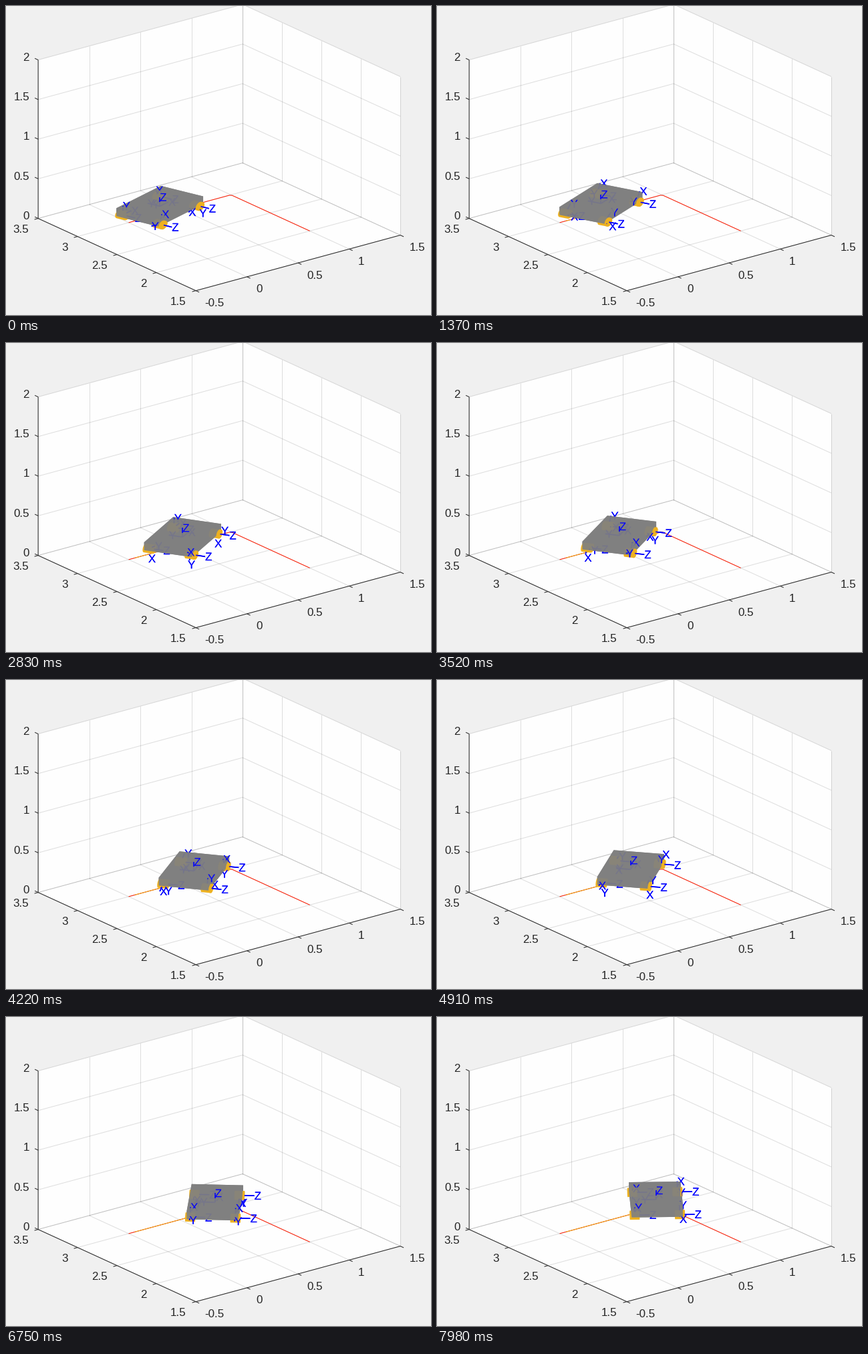
A matplotlib script for the animation above (8 s loop, 636x462 px).

```python
import itertools
import numpy as np
import matplotlib.pyplot as plt
from matplotlib.animation import FuncAnimation
from matplotlib.patches import PathPatch
from matplotlib.path import Path
from matplotlib.textpath import TextPath

W, H, DPI = 636, 462, 100
FRAMES, LOOP = 105, 8000
PX = 72 / DPI
FONT = 17
ORANGE, GRAY, BLUE, INK = "#edb120", "#808080", "#0000ff", "#262626"

plt.rcParams["font.family"] = "Liberation Sans"
fig = plt.figure(figsize=(W / DPI, H / DPI), dpi=DPI, facecolor="#f0f0f0")
ax = fig.add_axes([0, 0, 1, 1])
ax.set_xlim(-0.5, W - 0.5)
ax.set_ylim(H - 0.5, -0.5)
ax.axis("off")


def project(p):
    """World x, y, z (rows) to stage pixels."""
    x, y, z = np.asarray(p, float).T
    return np.array([283.6 + 153 * (x + .5) - 118 * (y - 1.5),
                     425.1 - 41.5 * (x + .5) - 54 * (y - 1.5) - 118.5 * z]).T


def line(pts, color, width=1, z=1, **kw):
    return ax.plot(*np.asarray(pts).T, color=color, lw=width * PX, zorder=z,
                   solid_capstyle="butt", **kw)[0]


def poly(pts, color, z, alpha=1):
    return ax.fill(*np.asarray(pts).T, color=color, lw=0, zorder=z, alpha=alpha)[0]


def hull(pts):
    pts = sorted(map(tuple, pts))

    def half(seq):
        out = []
        for p in seq:
            while len(out) > 1 and ((out[-1][0] - out[-2][0]) * (p[1] - out[-2][1])
                                    <= (out[-1][1] - out[-2][1]) * (p[0] - out[-2][0])):
                out.pop()
            out.append(p)
        return out[:-1]

    return half(pts) + half(pts[::-1])


def draw_stage():
    lo, hi = (-.5, 1.5, 0), (1.5, 3.5, 2)
    x0, y0, z0 = lo
    x1, y1, z1 = hi
    for quad in ([(x0, y0, z0), (x1, y0, z0), (x1, y1, z0), (x0, y1, z0)],
                 [(x0, y1, z0), (x1, y1, z0), (x1, y1, z1), (x0, y1, z1)],
                 [(x1, y0, z0), (x1, y1, z0), (x1, y1, z1), (x1, y0, z1)]):
        poly(project(quad), "#fefefe", 0)
    for t in np.arange(0, 2.1, .5):
        x, y = x0 + t, y0 + t
        for a, b in (((x, y0, z0), (x, y1, z0)), ((x, y1, z0), (x, y1, z1)),
                     ((x0, y, z0), (x1, y, z0)), ((x1, y, z0), (x1, y, z1)),
                     ((x0, y1, t), (x1, y1, t)), ((x1, y0, t), (x1, y1, t))):
            line(project([a, b]), INK, alpha=.15)
    line(project([(x0, y1, z1), (x0, y1, z0), (x0, y0, z0), (x1, y0, z0)]), INK)
    for t in np.arange(0, 2.1, .5):
        for p, tick, off, val, ha in (
                ((x0 + t, y0, 0), (5, 2.3), (13.5, 17.5), x0 + t, "left"),
                ((x0, y0 + t, 0), (-5.5, 1.5), (-14.5, 15.5), y0 + t, "right"),
                ((x0, y1, t), (-5, -2.3), (-13, -4.6), t, "right")):
            q = project([p])[0]
            line([q, q + tick], INK)
            x, y = q + off
            ax.text(x, y + 5.9, f"{val:g}", color=INK, ha=ha, va="baseline",
                    fontsize=FONT * PX)
    line(project([(0, 3, 0), (.985, 3, 0), (1, 2.985, 0), (1, 2, 0)]), "#ff1a00", z=1.5)


# Body frame: forward, left, up
BOX_LO, BOX_HI = np.array([-.3, -.2, .05]), np.array([.3, .2, .15])
CORNERS = np.array(list(itertools.product(*zip(BOX_LO, BOX_HI))))
EDGES = [(p, q) for p, q in itertools.combinations(CORNERS, 2) if (p != q).sum() == 1]
RADIUS, HALF, AXIS = .05, .0375, .115
CAMERA = np.array([-1.0626, -1.3778, 1])
# Hub forward, hub left, spin in degrees: start, rate, acceleration
WHEELS = ((.25, .175, 118, -3.4, 0), (.25, -.175, 196, -8.28, 0),
          (-.25, .175, 0, -2.6, -.0075), (-.25, -.175, 76, -8.26, 0))
RIM = np.linspace(0, 2 * np.pi, 40, endpoint=False)
GLYPHS = {c: TextPath((0, 0), c, size=FONT) for c in "XYZ"}
STAGE_BOX = [(-9, -9), (-9, H + 9), (W + 9, H + 9), (W + 9, -9)]

live = []


def occluded(pts, cam):
    """True where the view ray from a local point passes through the body."""
    t1, t2 = (BOX_LO - pts) / cam, (BOX_HI - pts) / cam
    near = np.minimum(t1, t2).max(axis=1)
    far = np.maximum(t1, t2).min(axis=1)
    return far > np.maximum(near, 0) + 1e-6


def nearer_part(depth, cam):
    """Outline points of the part of the body in front of a depth."""
    pts = [p for p in CORNERS if p @ cam > depth]
    for p, q in EDGES:
        u, v = p @ cam - depth, q @ cam - depth
        if u * v < 0:
            pts.append(p + (q - p) * u / (u - v))
    return pts


def closed(pts):
    codes = [Path.MOVETO] + [Path.LINETO] * (len(pts) - 1) + [Path.CLOSEPOLY]
    return Path(list(pts) + [pts[0]], codes)


def glyph(name, xy, z, hole=None):
    shape = GLYPHS[name]
    path = Path(shape.vertices * (1, -1) + xy + (0, 5.9), shape.codes)
    patch = ax.add_patch(PathPatch(path, color=BLUE, lw=0, zorder=z))
    if hole:
        clip = Path.make_compound_path(closed(STAGE_BOX), closed(hole))
        patch.set_clip_path(clip, ax.transData)
    live.append(patch)


def drum(hub, b0, b1):
    a = hub[0] + RADIUS * np.cos(RIM)
    c = hub[2] + RADIUS * np.sin(RIM)
    return np.concatenate([np.c_[a, np.full_like(a, b), c] for b in (b0, b1)])


def draw_axis(place, cam, origin, direction, start, name):
    origin, direction = np.array(origin), np.array(direction)
    pts = origin + np.linspace(start, AXIS, 25)[:, None] * direction
    xy, hid = place(pts), occluded(pts, cam)
    above = np.where(pts[:, 2:] < 0, np.nan, xy)   # lines stop at the floor
    live.append(line(above, BLUE, 1.6, 3.1))
    live.append(line(np.where(hid[:, None], np.nan, above), BLUE, 1.6, 6))
    cover = nearer_part(pts[-1] @ cam, cam)
    glyph(name, xy[-1], 3.2)
    glyph(name, xy[-1], 7, hull(place(cover)) if cover else None)


def update(i):
    while live:
        live.pop().remove()
    n = i - (i > 1)          # the second pose is held for two steps
    s = .304 + .0062 * n
    th = .302 + .0063 * n
    co, si = np.cos(th), np.sin(th)

    def place(p):
        a, b, c = np.asarray(p, float).T
        return project(np.c_[s + a * co - b * si, 3 + a * si + b * co, c])

    dx, dy, dz = CAMERA
    cam = np.array([dx * co + dy * si, dy * co - dx * si, dz])

    live.append(line(project([(.06, 3, 0), (s, 3, 0)]), ORANGE, z=1.6))
    shell = hull(place(CORNERS))
    live.append(poly(shell, GRAY, 2))
    live.append(poly(shell, GRAY, 4, .92))

    for name, d in zip("XYZ", np.eye(3)):
        draw_axis(place, cam, (0, 0, .1), d, 0, name)

    for a, b, start, rate, acc in WHEELS:
        hub = (a, b, RADIUS)
        live.append(poly(hull(place(drum(hub, b - HALF, b + HALF))), ORANGE, 3))
        if b < 0:
            live.append(poly(hull(place(drum(hub, b - HALF, -.2))), ORANGE, 5))
        phi = np.radians(start + rate * n + acc * n * n)
        c, v = np.cos(phi), np.sin(phi)
        draw_axis(place, cam, hub, (c, 0, v), RADIUS, "X")
        draw_axis(place, cam, hub, (-v, 0, c), RADIUS, "Y")
        draw_axis(place, cam, hub, (0, -1, 0), HALF, "Z")
    return live


draw_stage()
anim = FuncAnimation(fig, update, frames=FRAMES, interval=LOOP / FRAMES,
                     init_func=lambda: [], repeat=True, repeat_delay=0)
plt.show()
```
